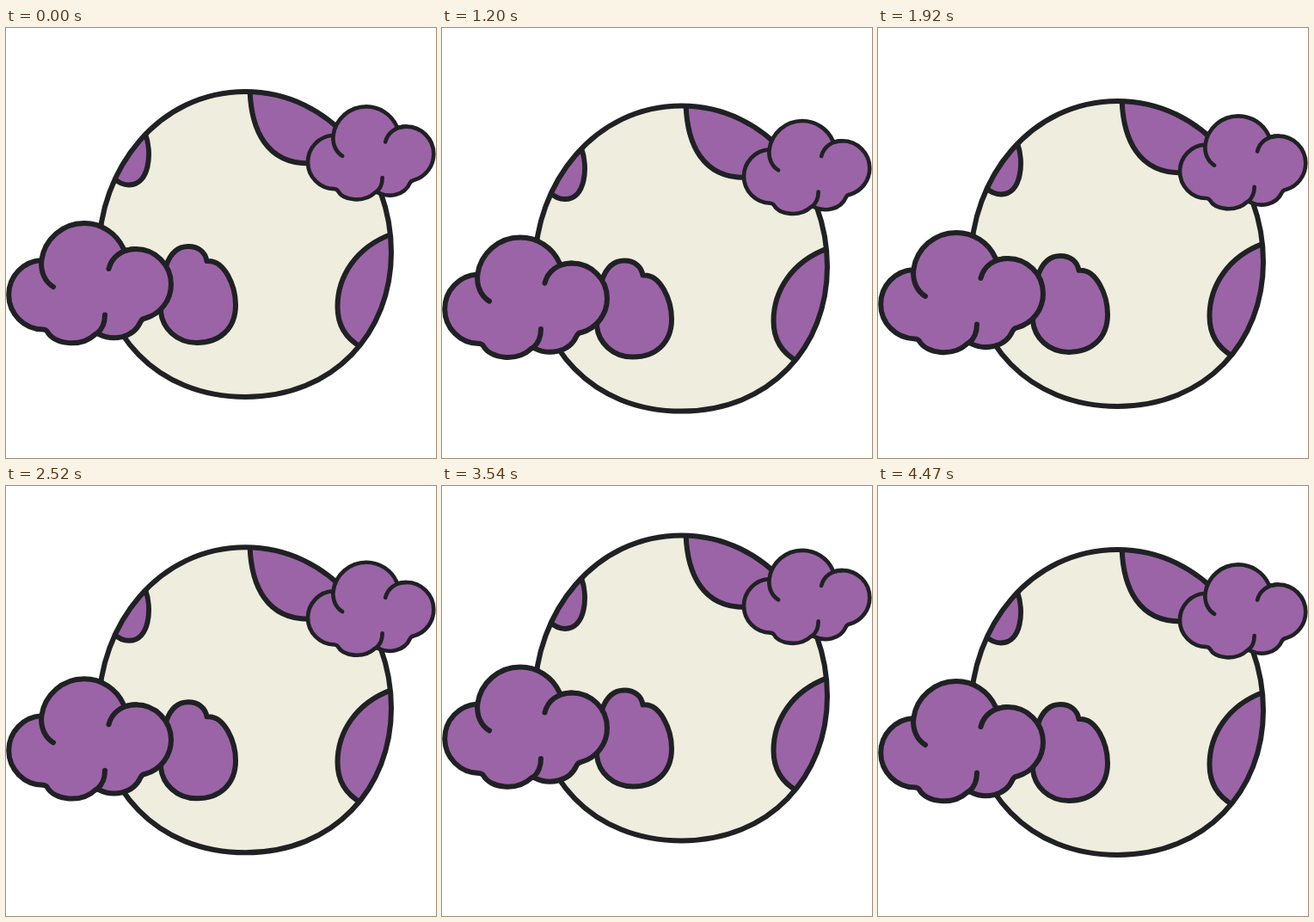
An HTML page that plays this animation: 500 px wide and 500 px high, repeating every 4.5 s.

```html
<!DOCTYPE html>
<html lang="en">
<head>
<meta charset="utf-8">
<title>Floating egg moon</title>
<style>
  html, body { margin: 0; width: 100%; height: 100%; overflow: hidden; background: #fff; }
  svg { display: block; width: 100%; height: 100%; }
  .ink { stroke: #202124; stroke-width: 6; stroke-linecap: round; stroke-linejoin: round; }
  .purple { fill: #9b64a7; }
</style>
</head>
<body>
<svg viewBox="0 0 500 500">
  <defs>
    <path id="moon" d="M278.5 74C378 74 448 164 448 261C448 354 381.500 429 278.500 429C174.500 429 108 354 108 261C108 164 177.500 74 278.500 74Z"/>
    <clipPath id="inside"><use href="#moon"/></clipPath>
    <g id="cloud" class="ink">
      <path class="purple" d="M41.300 270A40.300 40.300 0 0 0 3.200 310.300A40.300 40.300 0 0 0 43 350.500Q46 350.500 48 353C56 368 87 372 104 356Q105.500 354.800 108 356C124 364 148 361 156.500 341.500Q158.500 337.800 162 337.500A41 41 0 0 0 192 298A41 41 0 0 0 151 257Q145 257 140.500 258.500Q138 259 136.500 256.300A50 50 0 0 0 91 227A50 50 0 0 0 41.300 270Z"/>
      <path fill="none" d="M41.300 270C40 283 45 295 55 301M119.500 280C123 266 135 257 151 257M115 333.500C115 343 112 350 106 355"/>
    </g>
  </defs>
  <g id="scene">
    <use href="#moon" fill="#eeedde"/>
    <g class="ink purple" clip-path="url(#inside)">
      <path d="M283.500 70C284.500 120 304 157.500 352 157.500L420 150L390 60Z"/>
      <path d="M162 123C170 145 167 182.500 143 182.500C136 182.500 131 180 126 175L100 130Z"/>
      <path d="M449 239.500C406 255 385.500 290 385.500 324C385.500 345 395 361 413 371L470 350Z"/>
      <path d="M186 277C191 262 200 254 212 254C224 254 232 261 233.500 271C254 269 267 300 267 322C267 350 248 366 222 366C198 366 182 349 180 330Z"/>
    </g>
    <use href="#moon" class="ink" fill="none"/>
    <use href="#cloud"/>
    <use href="#cloud" transform="translate(348.500 -84.500) scale(.775)"/>
  </g>
</svg>
<script>
  const LOOP = 4500, STEP = 30, REACH = 20.6;
  const keys = [[0, 0], [1490, REACH], [3313, -REACH], [4470, 0], [LOOP, 0]];
  const scene = document.getElementById("scene");

  // Linear travel between the turning points.
  function drift(t) {
    const i = keys.findIndex(k => t < k[0]);
    const [t0, y0] = keys[i - 1], [t1, y1] = keys[i];
    return y0 + (y1 - y0) * (t - t0) / (t1 - t0);
  }

  function draw(now) {
    const t = Math.floor((now % LOOP) / STEP) * STEP;
    scene.setAttribute("transform", `translate(0 ${drift(t).toFixed(2)})`);
    requestAnimationFrame(draw);
  }
  draw(performance.now());
</script>
</body>
</html>
```
